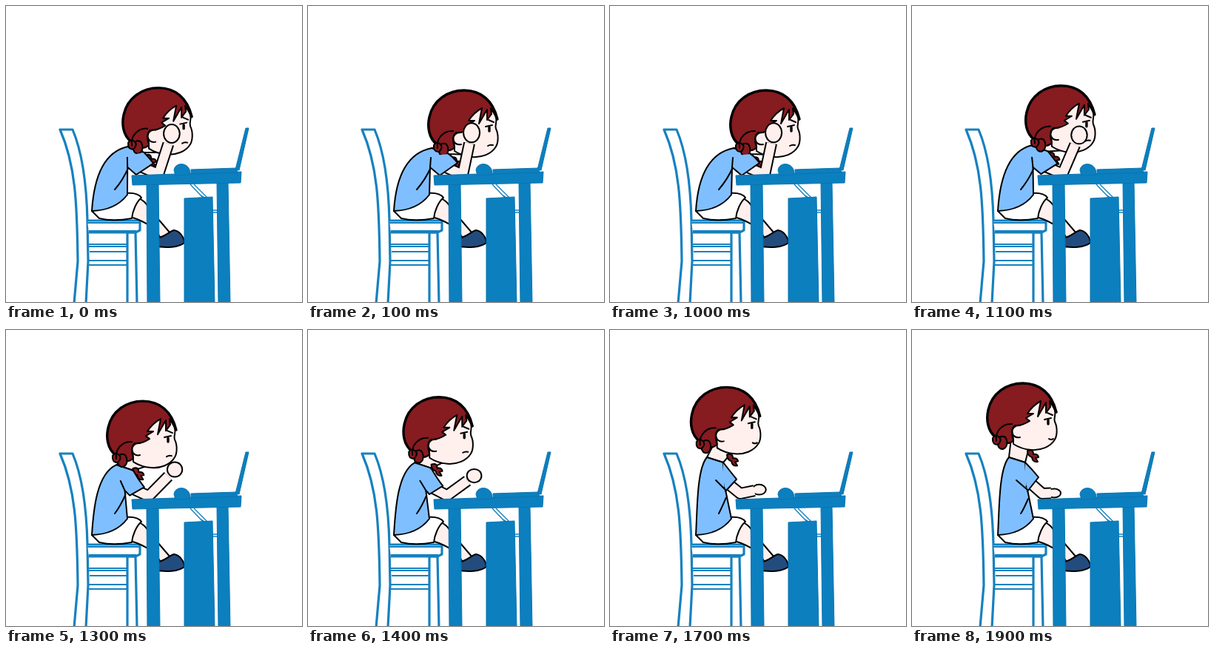
These frames come from a looping animation (400x400 px, 2600 ms). An HTML page:

```html
<!DOCTYPE html>
<html lang="en">
<head>
<meta charset="utf-8">
<title>Girl at a desk</title>
<style>
  html, body { margin: 0; width: 100%; height: 100%; overflow: hidden; background: #fff; }
  svg { display: block; width: 100%; height: 100%; }
  .ink { stroke: #000; stroke-width: 2; stroke-linejoin: round; stroke-linecap: round; }
  .line { fill: none; }
  .bold { stroke-width: 3.4; }
  .skin { fill: #fff0ee; }
  .hair { fill: #861b20; }
  .shirt { fill: #80bfff; }
  .white { fill: #fff; }
  .shoe { fill: #234c7e; }
  .chair { fill: #fff; stroke: #1681c0; stroke-width: 3.2; stroke-linejoin: round; }
  .thin { fill: none; stroke-width: 1.8; }
  .desk { fill: #0c7fbf; stroke: #0a75b0; stroke-width: 1; }
  .wire { fill: none; stroke: #1681c0; stroke-width: 1.4; }
</style>
</head>
<body>
<svg viewBox="0 0 400 400">
  <g class="chair">
    <path d="M73 167L90 167C104 200 109 245 110 290L111 345L108 402L92 402L97 345C96 265 94 215 73 167Z"/>
    <path d="M164 306V402H177L175 306Z"/>
    <path d="M110 290H181V303L175 306H112"/>
    <path class="thin" d="M110 293H180M112 304H176M112 322H163M112 325H163M113 332H163M112 344H163M112 350H163"/>
  </g>
  <g id="girl"></g>
  <g class="desk">
    <path class="wire" d="M249 241L267 260M254 241L272 259M262 255L270 260M279 276H287M279 279H287"/>
    <path d="M241 260L279 258L282 402H241Z"/>
    <path d="M190 240H206L208 402H191Z"/>
    <path d="M285 238H300L303 402H287Z"/>
    <path d="M170 229L318 224L317 239L171 242Z"/>
    <path d="M227 222C228 212 243 210 248 221L249 228L229 229Z"/>
    <path d="M250 221L311 219L313 225L250 227Z"/>
    <path d="M324 165H328L315 222L310 221Z"/>
  </g>
</svg>
<script>
const LOOP = 2600, STEP = 100, RISE = 1000, RISE_STEPS = 9;
const girl = document.getElementById('girl');

// 0 is slumped on the fist, 1 is sitting upright
function lift(t) {
  if (t < RISE) return t < 100 ? 0.08 : t < 300 ? 0 : -0.07;
  const n = Math.min(RISE_STEPS, Math.floor((t - RISE) / STEP));
  return 1 - (1 - n / RISE_STEPS) ** 1.37;
}

const lerp = (a, b, k) => [a[0] + (b[0] - a[0]) * k, a[1] + (b[1] - a[1]) * k];
const shift = (p, x, y) => [p[0] + x, p[1] + y];
const shape = (cls, d) => `<path class="ink ${cls}" d="${d}"/>`;

// All joints follow from the lift; the shoulders get there a little before the head
function joints(u) {
  const v = Math.min(1, 1.15 * u);
  const elbow = lerp([209, 228], [176, 221], v);
  const angle = (78 - 76 * u) * Math.PI / 180, reach = 58 - 42 * u * u;
  return {
    head: lerp([162, 113], [101, 71], u),
    nape: lerp([167, 192], [131, 172], v),
    back: lerp([127, 200], [117, 188], v),
    collar: lerp([190, 200], [153, 179], v),
    cuff: shift(lerp([202, 212], [171, 199], v), 0, 7 * Math.sin(Math.PI * u)),
    hem: lerp([178, 229], [156, 218], v),
    pit: lerp([165, 218], [156, 216], v),
    elbow,
    fist: shift(elbow, reach * Math.cos(angle), -reach * Math.sin(angle))
  };
}

function legs() {
  return shape('skin', 'M168 258C180 258 188 263 193 273L222 307L210 316C204 302 192 292 168 285Z') +
    shape('shoe', 'M200 314C214 314 219 305 227 303C235 304 241 313 241 320C234 326 216 328 200 324Z') +
    shape('white', 'M160 253C170 252 179 253 183 259C176 265 171 277 170 287C154 290 138 290 126 287L116 277Z');
}

function neck(j) {
  return shape('skin', `M${shift(j.head, 33, 75)}L${j.nape}L${j.collar}L${shift(j.head, 57, 88)}Z`);
}

function torso(j, u) {
  const fold = shift(j.pit, 1, 12 * u);
  return shape('shirt', `M${j.nape}C${j.back} 118 245 116 277Q148 276 164 255L${j.pit}L${j.collar}Z`) +
    shape('line', `M${fold}Q${shift(fold, -7, 16)} 147 248`);
}

function sleeve(j, u) {
  const top = `M${j.collar}Q${shift(j.cuff, -8, -10)} ${j.cuff}L${j.hem}L${j.pit}`;
  return `<path class="shirt" d="${top}L${shift(j.pit, -3, -15)}Z"/>` +
    shape('line', `${top}L${shift(j.pit, 1 - 16 * u, -13)}`);
}

function head([x, y], u) {
  const mouth = u > 0.75 ? 'M84 76Q87 78 90 76' : 'M81 76Q84 74 88 75';
  const cap = 'M12 74C1 65 -1 50 2 37C7 14 27 1 49 1C72 1 88 15 94 40';
  const knot = `translate(${38 + 24 * u * u} 92)`;
  const ear = 'M45 58C30 57 32 77 45 74';
  return `<g transform="translate(${x} ${y})">` +
    `<g transform="${knot}">` + shape('hair', 'M-7 0Q1 -3 1 5Q7 4 8 9L4 10L7 15Q0 16 -1 9Q-7 7 -7 0Z') + '</g>' +
    shape('skin', 'M34 30L88 24L92 38C94 44 90 47 92 53C96 61 95 72 92 77C86 87 73 92 60 91C49 90 42 87 36 83Z') +
    shape('hair', cap + 'L85 25L86 33L80 41L80 27L69 46L73 25Q62 31 55 42L63 42L53 48L58 52Q47 59 38 58C32 63 34 72 36 78Q27 88 12 74Z') +
    shape('line bold', cap) +
    shape('hair', 'M8 75Q12 69 17 74Q25 70 27 78Q29 87 22 90Q16 90 15 84Q7 84 8 75Z') +
    shape('line', 'M34 56C22 55 11 65 13 79M17 74Q21 78 15 84') +
    `<path class="skin" d="${ear}Z"/>` + shape('line', ear) +
    shape('line', 'M78 50L87 48M82 41L89 44' + mouth) +
    shape('line bold', 'M83 51V56') +
    '</g>';
}

// Limb and fist drawn twice, so that they share one outline
function arm(j, u) {
  const start = shift(lerp(j.cuff, j.hem, 0.5), -5, -3);
  const path = `M${start}L${j.elbow}L${lerp(j.elbow, j.fist, 0.75)}`;
  const layer = (color, grow) =>
    `<path d="${path}" fill="none" stroke="${color}" stroke-width="${14 + 2 * grow}" stroke-linejoin="round"/>` +
    `<ellipse cx="${j.fist[0]}" cy="${j.fist[1]}" rx="${11 - 2 * u + grow}" ry="${13 - 7 * u + grow}" fill="${color}"/>`;
  return layer('#000', 1) + layer('#fff0ee', -1);
}

function draw(u) {
  const j = joints(u);
  girl.innerHTML = legs() + neck(j) + torso(j, u) + head(j.head, u) + arm(j, u) + sleeve(j, u);
}

const begin = performance.now();
let shown = null;

function tick() {
  const u = lift((performance.now() - begin) % LOOP);
  if (u !== shown) draw(shown = u);
  requestAnimationFrame(tick);
}
tick();
</script>
</body>
</html>
```
